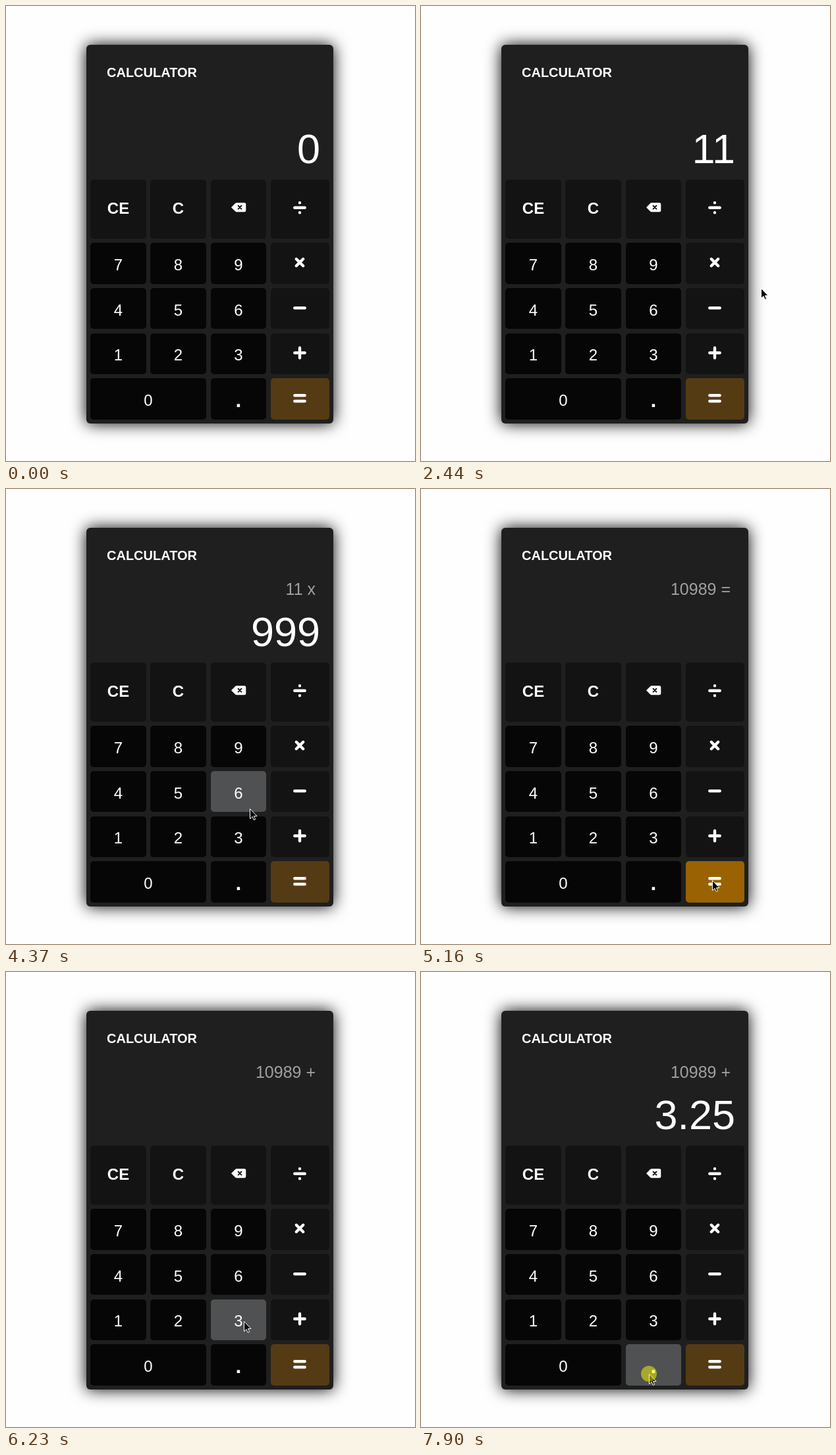
An HTML page that plays this animation: 621x692 px, repeating every 8000 ms.

```html
<!DOCTYPE html>
<html lang="en">
<head>
<meta charset="utf-8">
<title>Calculator</title>
<style>
  html, body { margin: 0; width: 100%; height: 100%; overflow: hidden; background: #fefefe; }
  #body { position: absolute; left: 122px; top: 59px; width: 375px; height: 576px;
          border-radius: 6px; background: #1f1f1f; box-shadow: 0 0 25px #000; }
  svg { position: absolute; left: 0; top: 0;
        font-family: "Liberation Sans", Arial, sans-serif; }
  text { fill: #fff; white-space: pre; }
  .key { font-size: 24px; text-anchor: middle; }
  .bold { font-weight: bold; }
  .icon { fill: none; stroke: #fff; stroke-width: 4.4; stroke-linecap: round; }
  #history, #main { text-anchor: end; }
</style>
</head>
<body>
<div id="body"></div>
<svg width="621" height="692" viewBox="0 0 621 692">
  <text class="bold" x="153" y="108" font-size="20">CALCULATOR</text>
  <text id="history" x="470" y="161" font-size="25" style="fill:#a0a0a0"></text>
  <text id="main" x="477" y="239" font-size="63"></text>
  <g id="keys"></g>
  <path d="M342 306.2L348.2 300Q349 299.2 350 299.2H362Q364.3 299.2 364.3 301.5V311Q364.3 313.2 362 313.2H350Q349 313.2 348.2 312.4Z" fill="#fff"/>
  <path d="M352.6 303.8l4.8 4.8m0-4.8l-4.8 4.8" stroke="#131313" stroke-width="2" stroke-linecap="round"/>
  <g class="icon">
    <path d="M438.3 306.8h15.4M446 299.3h.01M446 314.3h.01"/>
    <path d="M440.8 384.8l10.4 10.4m0-10.4l-10.4 10.4"/>
    <path d="M438.3 459.2h15.4"/>
    <path d="M438.3 527.5h15.4M446 519.8v15.4"/>
    <path d="M438.3 592.2h15.4M438.3 601h15.4"/>
  </g>
  <path id="cursor" d="M.5.5V15.6L4 12.3L6.3 17.4L8.6 16.4L6.4 11.5H11Z" fill="#000" stroke="#fff"/>
  <circle id="press" r="12" fill="#ff0" fill-opacity=".5"/>
</svg>
<script>
const LOOP = 8000, TICK = 66.6, HOLD = 60;
const $ = id => document.getElementById(id);

function add(tag, attrs, text = '') {
  const el = document.createElementNS('http://www.w3.org/2000/svg', tag);
  for (const name in attrs) el.setAttribute(name, attrs[name]);
  el.textContent = text;
  return $('keys').appendChild(el);
}

// Rows from the top; "_" marks a key whose symbol is drawn as an icon.
const keys = [];
['CE C _ _', '7 8 9 _', '4 5 6 _', '1 2 3 _', '0  . ='].forEach((row, r) => row.split(' ').forEach((label, c) => {
  if (!label) return;
  const x = 128 + 91.4 * c, y = r ? 360 + 68.8 * (r - 1) : 264;
  const left = Math.round(x), top = Math.round(y);
  const right = Math.round(x + (label === '0' ? 176 : c === 3 ? 88.8 : 84.6));
  const bottom = Math.round(y + (r ? 62.6 : 90));
  const equals = label === '=', dot = label === '.';
  const fill = equals ? '#553b14' : r === 0 || c === 3 ? '#131313' : '#060606';
  const rect = add('rect', { x: left, y: top, width: right - left, height: bottom - top, rx: 5 });
  keys.push({ left, right, top, bottom, rect, fill, hover: equals ? '#9a6202' : '#505153' });
  if (label === '_' || equals) return;
  add('text', {
    class: r === 0 || dot ? 'key bold' : 'key',
    x: (left + right) / 2,
    y: dot ? 610 : Math.round(y + (r ? 41.8 : 52)),
    style: dot ? 'font-size:32px' : ''
  }, label);
}));

// Cursor trips: start and end time, destination, optional control point of the curve.
const entry = [590, 491];
const trips = [
  [590, 790, [362, 585]],
  [990, 1450, [171, 524], [207, 377]],
  [2310, 2770, [447, 390], [680, 430]],
  [3110, 3370, [342, 396], [362, 452]],
  [4300, 4700, [442, 595], [350, 480]],
  [5230, 5890, [446, 523], [448, 400]],
  [6160, 6230, [361, 531]],
  [6490, 6630, [346, 603]],
  [6890, 6960, [279, 533]],
  [7230, 7360, [265, 468]],
  [7560, 7760, [346, 611]]
];

const clicks = [
  [1720, '1'], [2180, '1'], [2980, 'x'], [3500, '9'], [3770, '9'], [4040, '9'], [4900, '='],
  [6030, '+'], [6360, '3'], [6760, '.'], [7100, '2'], [7430, '5'], [7900, '.']
];

function cursorAt(t) {
  const i = trips.findLastIndex(trip => trip[0] <= t);
  if (i < 0) return [-50, -50];
  const [start, end, to, via] = trips[i];
  const from = i ? trips[i - 1][2] : entry;
  // The entry position is itself the first step of the first trip.
  const first = i ? 1 : 0;
  const step = Math.floor((t - start + 7) / TICK) + first;
  const steps = Math.round((end - start) / TICK) + first;
  const p = Math.min(1, step / steps), u = 1 - (1 - p) ** 2;
  return to.map((b, k) => {
    const a = from[k], mid = via ? via[k] : (a + b) / 2;
    return (1 - u) ** 2 * a + 2 * u * (1 - u) * mid + u * u * b;
  });
}

const operations = { '+': (a, b) => a + b, x: (a, b) => a * b, '=': (a, b) => b };

function calculate(pressed) {
  let total = 0, op = '', main = '0';
  for (const key of pressed) {
    if (key in operations) {
      if (main) total = op ? operations[op](total, +main) : +main;
      op = key;
      main = '';
    } else if (key !== '.' || !main.includes('.')) {
      main = main === '0' ? key : main + key;
    }
  }
  return [op && `${total} ${op}`, main];
}

function draw(t) {
  const [x, y] = cursorAt(t);
  const last = clicks.at(-1)[0];
  const held = ([at]) => t >= at && (t < at + HOLD || at === last);
  const released = clicks.filter(c => t >= c[0] && !held(c)).map(c => c[1]);
  [$('history').textContent, $('main').textContent] = calculate(released);
  for (const k of keys) {
    const over = x >= k.left && x < k.right && y >= k.top && y < k.bottom;
    k.rect.setAttribute('fill', over ? k.hover : k.fill);
  }
  for (const id of ['cursor', 'press']) {
    $(id).setAttribute('transform', `translate(${Math.round(x)} ${Math.round(y)})`);
  }
  $('press').style.display = clicks.some(held) ? '' : 'none';
}

const origin = performance.now();
function frame() {
  draw((performance.now() - origin) % LOOP);
  requestAnimationFrame(frame);
}
frame();
</script>
</body>
</html>
```
